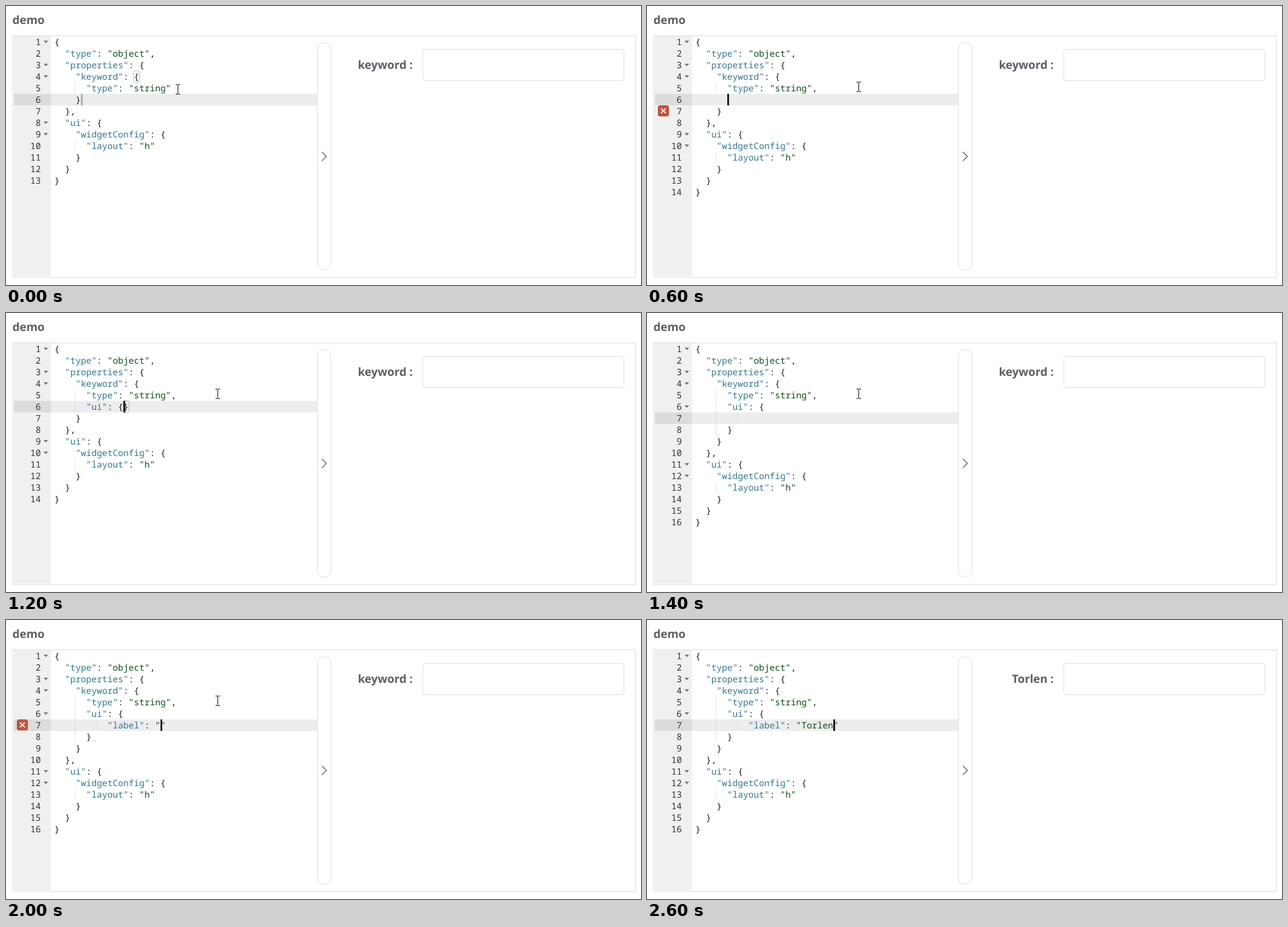
Animation, 988 px wide and 435 px high, one loop 3.2 s. Source, as an HTML page:

```html
<!DOCTYPE html>
<html lang="en">
<head>
<meta charset="utf-8">
<title>demo</title>
<style>
  html, body { margin: 0; width: 100%; height: 100%; overflow: hidden; background: #fff; }
  svg { display: block; width: 988px; height: 435px; text-rendering: geometricPrecision; }
  .heading { font: 700 17.7px "Open Sans", "Noto Sans", sans-serif; fill: #5c5e62; }
  .code { font: 13.75px "Noto Sans Mono", "Liberation Mono", monospace; fill: #1c1c1c; }
  .code .key { fill: #2f7a90; }
  .code .str { fill: #0d4f16; }
  .code .num { fill: #333; text-anchor: end; }
  .code .item { fill: #3a3a3a; }
  .code .hit { fill: #000; font-weight: 700; }
  .code .meta { fill: #858585; text-anchor: end; }
  .frame { fill: #fff; stroke: #dcdfe6; }
</style>
</head>
<body>
<svg viewBox="0 0 988 435" xmlns="http://www.w3.org/2000/svg">
  <defs>
    <filter id="shadow" x="-10%" y="-30%" width="120%" height="170%">
      <feDropShadow dx="2" dy="3" stdDeviation="2" flood-opacity=".25"/>
    </filter>
  </defs>
  <rect width="988" height="435" fill="#fff"/>
  <text class="heading" x="10" y="28">demo</text>
  <rect class="frame" x="10.5" y="46.5" width="969" height="377"/>
  <rect x="12" y="47" width="58" height="375" fill="#f0f0f0"/>
  <g id="editor" class="code"></g>
  <rect class="frame" x="484.5" y="57.5" width="21" height="354" rx="9"/>
  <path d="M491.5 227.5l7 7-7 7" fill="none" stroke="#606266" stroke-width="1.3"/>
  <text id="label" class="heading" x="632.8" y="98" text-anchor="end"></text>
  <rect class="frame" x="648.5" y="67.5" width="313" height="49" rx="4"/>
  <g id="overlay" class="code"></g>
</svg>
<script>
const LOOP = 3200;
const CHAR = 8.25, LEFT = 76, ROW = 18, TOP = 47;
const ITEM = 21, POPUP_W = 353;

const colX = col => LEFT + col * CHAR;
const rowY = row => TOP + (row - 1) * ROW;
const rect = (x, y, w, h, fill, extra = '') =>
  `<rect x="${x}" y="${y}" width="${w}" height="${h}" fill="${fill}" ${extra}/>`;
const text = (x, y, cls, str) => `<text x="${x}" y="${y}" class="${cls}">${str}</text>`;

const head = ['{', '  "type": "object",', '  "properties": {', '    "keyword": {'];
const tail = ['    }', '  },', '  "ui": {', '    "widgetConfig": {',
  '      "layout": "h"', '    }', '  }', '}'];
const doc = (...middle) => [...head, ...middle, ...tail];
const typeLine = '      "type": "string"';
const withType = (...rest) => doc(typeLine + ',', ...rest);
const withUi = line => withType('      "ui": {', ' '.repeat(10) + line, '      }');

// An asterisk marks the next letter as highlighted.
const uiItems = ['u*i', 'a*ud*io', 'u*ni*queItems', 'mu*lti*pleOf', 'requ*i*red',
  'exclu*si*veMaximum', 'exclu*si*veMinimum', 'cu*stomRule'];
const lItems = ['l*abel', 'pl*aceholder', 'noL*abelSpace', 'mul*tipleOf', 'boo*lean',
  'showL*abel', 'itemCl*ass', 'val*ueTemplate'];
const laItems = ['l*a*bel', 'pl*a*ceholder', 'noL*a*belSpace', 'boo*le*an', 'showL*a*bel',
  'itemCl*a*ss', 'val*ueTempla*te', 'excl*usiveMa*ximum'];

const near = [267.5, 130], far = [329.5, 126];
const states = [
  { at: 0, lines: doc(typeLine), row: 6, caret: 5, caretFill: '#a9a9ab', bar: '#ebecee',
    bracket: [4, 15], mouse: near },
  { at: 200, lines: doc(typeLine), row: 5, mouse: [267.5, 129] },
  { at: 400, lines: doc(typeLine), row: 5, caret: 22, mouse: near },
  { at: 600, lines: withType(''), row: 6, caret: 6, error: true },
  { at: 800, lines: withType('      ui'), row: 6, caret: 8, error: true,
    popup: { col: 6, items: uiItems, thumb: 101 } },
  { at: 1200, lines: withType('      "ui": {}'), row: 6, caret: 13, bracket: [6, 13] },
  { at: 1400, lines: withUi(''), row: 7 },
  { at: 1600, lines: withUi('l'), row: 7, caret: 11,
    popup: { col: 10, items: lItems, thumb: 40 } },
  { at: 1800, lines: withUi('la'), row: 7, caret: 12, error: true,
    popup: { col: 10, items: laItems, thumb: 53 } },
  { at: 2000, lines: withUi('"label": ""'), row: 7, caret: 20, error: true },
  { at: 2200, lines: withUi('"label": "Tor"'), row: 7, caret: 23, label: '',
    popup: { col: 20, items: ['ajax'] } },
  { at: 2400, lines: withUi('"label": "Torl"'), row: 7, caret: 24, label: '' },
  { at: 2600, lines: withUi('"label": "Torlen"'), row: 7, caret: 26, label: 'Torlen',
    mouse: null }
];

function drawTokens(line, y) {
  let out = '';
  for (const m of line.matchAll(/"[^"]*"|[^\s"]+/g)) {
    const end = m.index + m[0].length;
    const cls = m[0][0] !== '"' ? '' : line[end] === ':' ? 'key' : 'str';
    out += text(colX(m.index) - .7, y, cls, m[0]);
  }
  return out;
}

function drawLine(line, i) {
  const y = rowY(i + 1);
  const indent = line.search(/\S|$/);
  let out = text(54.3, y + 14, 'num', i + 1);
  if (line.endsWith('{')) out += `<path d="M58.5 ${y + 7}h7l-3.5 4z" fill="#777"/>`;
  for (let col = 4; col < indent; col += 4) {
    const x = Math.floor(colX(col)) - 1.5;
    out += `<path d="M${x} ${y}v${ROW}" stroke="#d0d0d0" stroke-dasharray="1 1"/>`;
  }
  return out + drawTokens(line, y + 14);
}

function drawError() {
  return rect(17.5, 155.5, 16, 16, '#cb5237', 'rx="2.5" stroke="#a04a38"') +
    '<path d="M21.8 159.8l7.4 7.4m0-7.4l-7.4 7.4" stroke="#fff" stroke-width="1.8"/>';
}

function drawEditor(s) {
  const y = rowY(s.row);
  let out = rect(12, y, 58, ROW, '#dcdcdc') + rect(70, y, 414, ROW, s.bar || '#ededed');
  if (s.bracket) {
    const [row, col] = s.bracket;
    out += rect(colX(col) - 1, rowY(row) - .5, 9, 19, 'none', 'rx="3" stroke="#bfbfbf"');
  }
  out += s.lines.map(drawLine).join('');
  if (s.error) out += drawError();
  if (s.caret) out += rect(colX(s.caret) - .5, y, 2.5, ROW, s.caretFill || '#000');
  return out;
}

function drawItem(item, x, y) {
  let col = 0, out = '';
  for (const part of item.match(/\*.|[^*]+?(?=\*|$)/g)) {
    const hit = part[0] === '*';
    const str = hit ? part[1] : part;
    out += text(x + col * CHAR, y, hit ? 'hit' : 'item', str);
    col += str.length;
  }
  return out;
}

function drawScrollbar(x, y, h, thumb) {
  const mid = x + 10;
  return rect(x, y, 22, h, '#f1f1f1') + rect(x + 1.5, y + 21, 17, thumb, '#c1c1c1') +
    `<path d="M${mid - 4.5} ${y + 13.5}h9l-4.5-5z" fill="#a3a3a3"/>` +
    `<path d="M${mid - 4.5} ${y + h - 14}h9l-4.5 5z" fill="#484848"/>`;
}

function drawPopup({ col, items, thumb }, row) {
  const x = Math.floor(colX(col) - 7), y = rowY(row) + 20;
  const h = items.length * ITEM;
  let out = rect(x + .5, y + .5, POPUP_W - 1, h + 1, '#fbfbfb', 'stroke="#d0d0d0" filter="url(#shadow)"');
  out += rect(x + 1, y + 1, POPUP_W - 2, ITEM, '#cad6fa');
  if (thumb) out += drawScrollbar(x + 330, y + 1, h, thumb);
  items.forEach((item, i) => {
    const base = y + 16 + i * ITEM;
    out += drawItem(item, colX(col) - .9, base);
    out += text(x + (thumb ? 326 : 347), base, 'meta', 'ncform');
  });
  return out;
}

function drawMouse([x, y]) {
  return `<path transform="translate(${x} ${y})" fill="none" stroke="#111"
    d="M-3.5-7.5h3m1 0h3M0-7V7M-3.5 7.5h3m1 0h3"/>`;
}

const editor = document.getElementById('editor');
const overlay = document.getElementById('overlay');
const label = document.getElementById('label');
let shown;

function render(time) {
  const s = states.findLast(state => state.at <= time % LOOP);
  if (s === shown) return;
  shown = s;
  const { popup, mouse = far, label: name = 'keyword' } = s;
  editor.innerHTML = drawEditor(s);
  overlay.innerHTML = (popup ? drawPopup(popup, s.row) : '') + (mouse ? drawMouse(mouse) : '');
  label.textContent = `${name} :`;
}

const start = performance.now();
function tick() {
  render(performance.now() - start);
  requestAnimationFrame(tick);
}
tick();
</script>
</body>
</html>
```
